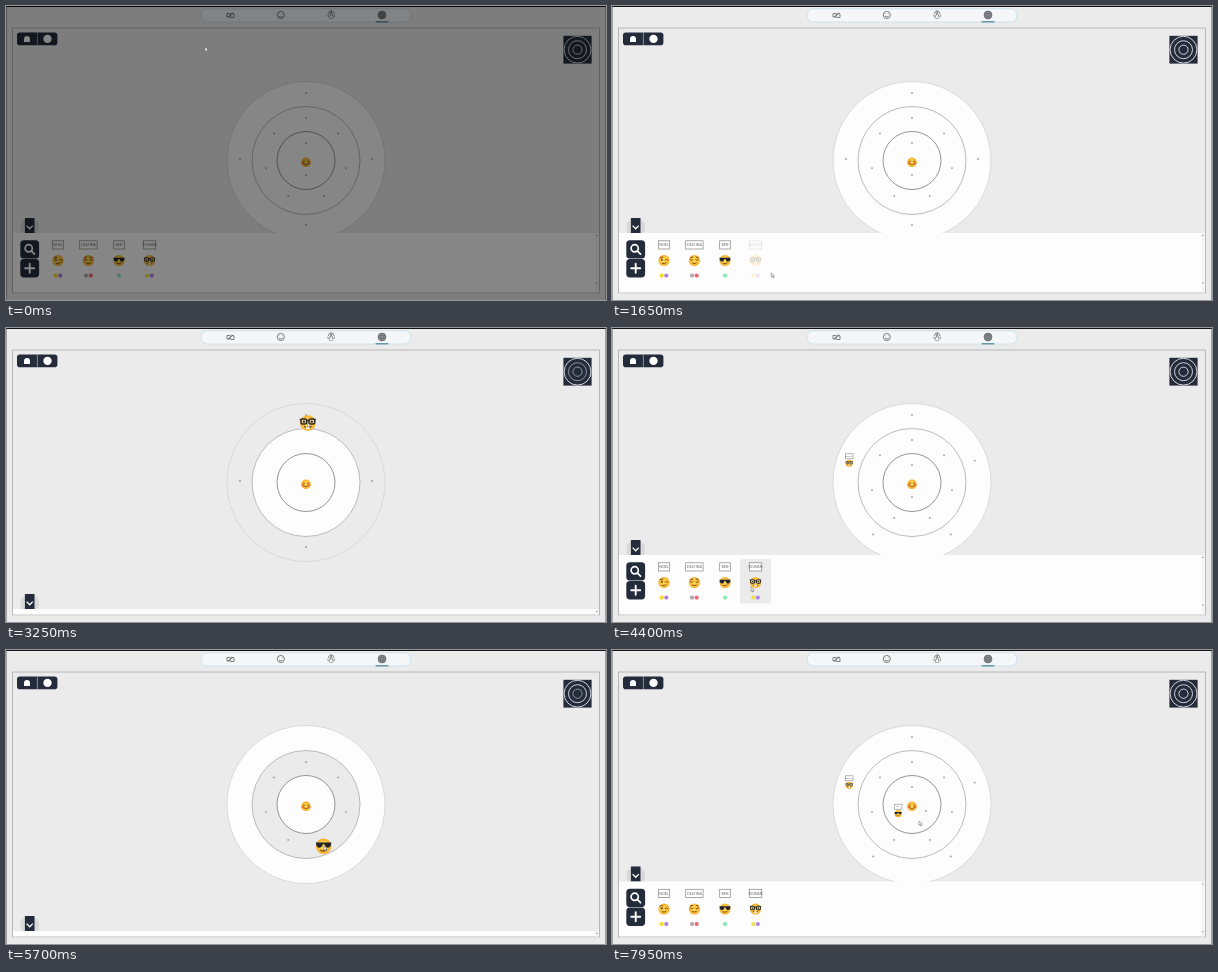
Animation, 600 px wide and 294 px high, one loop 8 s. Source, as an HTML page:

```html
<!DOCTYPE html>
<html lang="en">
<head>
<meta charset="utf-8">
<title>Rings</title>
<style>
html, body { margin: 0; width: 100%; height: 100%; overflow: hidden; background: #ebebeb; }
svg { display: block; width: 100vw; height: 100vh; }
text { font-family: Lato, "Open Sans", sans-serif; text-anchor: middle; fill: #666; }
</style>
</head>
<body>
<svg viewBox="0 0 600 294" preserveAspectRatio="none">
  <defs>
    <radialGradient id="skin"><stop offset=".45" stop-color="#ffd24a"/><stop offset="1" stop-color="#f5ab2b"/></radialGradient>
    <clipPath id="frame"><rect x="7" y="22" width="586" height="264.5"/></clipPath>
    <g id="head"><circle r="8" fill="url(#skin)"/></g>
    <g id="smile" fill="none" stroke="#6b3d12" stroke-width="1.3" stroke-linecap="round">
      <use href="#head" stroke="none"/>
      <circle cx="-5" cy="1.5" r="2" fill="#f5793b" stroke="none"/><circle cx="5" cy="1.5" r="2" fill="#f5793b" stroke="none"/>
      <path d="M-5 -1.5q1.6 -2.6 3.2 0M1.8 -1.5q1.6 -2.6 3.2 0M-3.6 2.5q3.6 4 7.2 0"/>
    </g>
    <g id="wink" fill="none" stroke="#6b3d12" stroke-width="1.3" stroke-linecap="round">
      <use href="#head" stroke="none"/>
      <ellipse cx="-3" cy="-1" rx="1.2" ry="1.7" fill="#6b3d12" stroke="none"/>
      <path d="M-5.5 -4.2q2 -1.6 4 -.5M1.5 -.8q2 -1.6 4 .3M-2.5 4q3 1.8 5.5 -1"/>
    </g>
    <g id="calm" fill="none" stroke="#6b3d12" stroke-width="1.3" stroke-linecap="round">
      <use href="#head" stroke="none"/>
      <path d="M-5.5 -1q1.8 2 3.6 0M1.9 -1q1.8 2 3.6 0M-5.5 -4l3 -1M5.5 -4l-3 -1M-2.8 3.6q2.8 2 5.6 0"/>
    </g>
    <g id="cool">
      <use href="#head"/>
      <path d="M-8 -4H8L7.2 -.5Q5.8 2 3.2 1.3Q1.2 .6 .8 -2H-.8Q-1.2 .6 -3.2 1.3Q-5.8 2 -7.2 -.5Z" fill="#202430"/>
      <path d="M-3 4q3 2.2 6 -.6" fill="none" stroke="#6b3d12" stroke-width="1.2" stroke-linecap="round"/>
    </g>
    <g id="nerd">
      <use href="#head"/>
      <g fill="#f6e3a6" stroke="#2b2a2c" stroke-width="1.5">
        <rect x="-7" y="-4" width="5.8" height="5" rx="1.8"/><rect x="1.2" y="-4" width="5.8" height="5" rx="1.8"/>
        <path d="M-8.2 -3.6h1.6M-1.4 -2.6h2.8M6.6 -3.6h1.6" fill="none"/>
      </g>
      <circle cx="-4" cy="-1.4" r="1.2" fill="#4a2c12"/><circle cx="4" cy="-1.4" r="1.2" fill="#4a2c12"/>
      <path d="M-3.8 3.2q3.8 3.6 7.6 0" fill="none" stroke="#6b3d12" stroke-width="1.2"/>
      <rect x="-1.8" y="3.8" width="3.6" height="2.2" fill="#fff"/>
    </g>
  </defs>

  <rect width="600" height="294" fill="#ebebeb"/>
  <rect x="6.5" y="22" width="587" height="264.8" fill="none" stroke="#b2b2b2" stroke-width=".9"/>

  <rect x="195.2" y="2.8" width="209.6" height="13.2" rx="6" fill="#f5f6f8" stroke="#c3e1eb" stroke-width=".8"/>
  <g fill="none" stroke="#606468" stroke-width=".8">
    <path d="M221 7.5h3.2v3.5h-3.2zM225 7l3 1v3.5h-3.5M222 11l5.5 -4"/>
    <circle cx="274.8" cy="9" r="3.6"/><path d="M273 10.2q1.8 1.6 3.6 0M273.3 7.6v.6M276.3 7.6v.6"/>
    <circle cx="325.2" cy="9.2" r="3.3" stroke-dasharray="2 .8"/><path d="M323.4 10.8l1.8 -4.4l1.8 4.4M322.5 6.5l2.7 -2l2.7 2"/>
    <circle cx="376" cy="9" r="3.9" fill="#888c90"/><circle cx="376" cy="9" r="2"/>
  </g>
  <rect x="369.6" y="15" width="12.8" height="1.5" fill="#6299ac"/>

  <rect x="11" y="26.4" width="40.4" height="12.8" rx="2.8" fill="#242b3b"/>
  <path d="M31.4 26.4v12.8" stroke="#a4a8b0" stroke-width=".8"/>
  <path d="M18 36v-3a3 3 0 0 1 6 0v3z" fill="#fff"/>
  <circle cx="41.5" cy="32.9" r="4.2" fill="#fff"/>

  <rect x="557.4" y="29.8" width="28.2" height="27.8" fill="#242b3b"/>
  <g id="icon" fill="none" stroke="#e4e6ea" stroke-width=".9"></g>

  <g id="board"></g>
  <use href="#smile" transform="translate(300 156.3) scale(.6)"/>

  <g clip-path="url(#frame)"><g id="panel">
    <rect x="14.5" y="-13.5" width="18.5" height="16" rx="6" fill="#d9d9da"/>
    <rect x="18.9" y="-15" width="9.6" height="15.2" fill="#242b3b"/>
    <path d="M20.6 -7.4l3.1 3.2l3.1 -3.2" fill="none" stroke="#fff" stroke-width="1.3"/>
    <rect x="7" width="586" height="62" fill="#fdfdfd"/>
    <rect x="589.5" width="3" height="62" fill="#f4f4f4"/>
    <path d="M589.8 3l1.1 -1.5l1.1 1.5zM589.8 49.5l1.1 1.5l1.1 -1.5z" fill="#999"/>
    <rect x="14.3" y="7.2" width="18.8" height="18.4" rx="3.6" fill="#242b3b"/>
    <rect x="14.3" y="26" width="18.8" height="18.4" rx="3.6" fill="#242b3b"/>
    <g fill="none" stroke="#fff" stroke-width="1.7" stroke-linecap="round">
      <circle cx="22.7" cy="15.3" r="3.6"/><path d="M25.5 18.2l3 3"/>
      <path d="M19.2 35.2h9M23.7 30.7v9" stroke-width="1.9"/>
    </g>
    <g id="items"></g>
  </g></g>

  <use id="drag"/>
  <path d="M0 .5H600" stroke="#111"/>
  <path d="M.3 0V294M599.7 0V294" stroke="#555" stroke-width=".6"/>
  <rect id="shade" width="600" height="294"/>
  <path id="cursor" d="M0 0V5.4L1.3 4.3L2.2 6.3L3.2 5.8L2.3 3.9H4Z" fill="#fff" stroke="#555" stroke-width=".6"/>
</svg>

<script>
const LOOP = 8000;
const CX = 300, CY = 154.5;
const RADII = [79, 54, 29];
const ORBITS = [66, 41, 16];
const LINES = ['#d6d6d6', '#b4b4b4', '#8a8a8a'];
const NERD_DROP = 3450, COOL_DROP = 7450;

const people = [
  { name: 'NOEL', face: 'wink', x: 52, w: 11.4, tags: ['#f4dd1f', '#b07fe0'] },
  { name: 'DELFINA', face: 'calm', x: 82.4, w: 17.4, tags: ['#b3a6ae', '#f06c6c'] },
  { name: 'BEN', face: 'cool', x: 113, w: 10.6, tags: ['#84ecb4'], hover: [4680, 4900], away: [4900, COOL_DROP] },
  { name: 'ROWAN', face: 'nerd', x: 143.5, w: 12.4, tags: ['#f0e04a', '#b583e6'], hover: [1200, 1520], hover2: [4250, 4620], away: [1520, NERD_DROP] }
];

// Pointer path: time, x, y
const route = [
  [0, 199, 41], [150, 199, 41], [900, 156, 153], [1250, 142, 257], [1480, 142, 258],
  [1650, 159, 267], [1850, 210, 230], [2200, 300, 150], [2340, 321, 127], [2400, 324, 107],
  [2600, 316, 104], [2900, 303, 95], [3400, 301, 95], [3750, 301, 95], [4250, 146, 250],
  [4400, 139, 259], [4580, 139, 259], [4720, 114, 255], [4900, 115, 255], [5200, 250, 225],
  [5450, 310, 203], [5650, 318, 196], [5800, 318, 196], [6250, 318, 187], [6600, 313, 172],
  [6850, 309, 165], [7100, 307, 171], [8000, 307, 171]
];
const drags = [
  { face: 'nerd', from: 1720, to: NERD_DROP },
  { face: 'cool', from: 4960, to: COOL_DROP }
];
// Highlighted ring: time, index (0 outer, 2 inner, -1 none)
const focus = [[0, -1], [2080, 0], [2180, 1], [2680, 0], [NERD_DROP, -1],
  [5120, 0], [5280, 1], [5980, 2], [COOL_DROP, -1]];
// Panel: start time, 1 shown or 0 hidden
const slides = [[1675, 0], [3725, 1], [4950, 0], [7625, 1]];

const $ = id => document.getElementById(id);
const clamp = v => Math.max(0, Math.min(1, v));
const within = (t, span) => !!span && t >= span[0] && t < span[1];

function add(parent, tag, attrs, label) {
  const el = document.createElementNS('http://www.w3.org/2000/svg', tag);
  for (const k in attrs) el.setAttribute(k, attrs[k]);
  if (label) el.textContent = label;
  parent.append(el);
  return el;
}

// CSS "ease" curve
function ease(x) {
  let lo = 0, hi = 1;
  for (let i = 0; i < 18; i++) {
    const u = (lo + hi) / 2, v = 1 - u;
    if (.75 * u * v * v + .75 * u * u * v + u ** 3 < x) lo = u; else hi = u;
  }
  return .3 * lo * (1 - lo) ** 2 + 3 * lo * lo * (1 - lo) + lo ** 3;
}

function pointer(t) {
  let i = 1;
  while (i < route.length - 1 && route[i][0] < t) i++;
  const [t0, x0, y0] = route[i - 1], [t1, x1, y1] = route[i];
  const p = clamp((t - t0) / (t1 - t0));
  return [x0 + (x1 - x0) * p, y0 + (y1 - y0) * p];
}

function spots(ring, count) {
  return Array.from({ length: count }, (_, i) => {
    const a = -i * 2 * Math.PI / count;
    return [CX + ORBITS[ring] * Math.sin(a), 153 - ORBITS[ring] * Math.cos(a)];
  });
}

function slots(parent, ring, count, person, at) {
  const g = add(parent, 'g', {});
  spots(ring, count).forEach(([x, y], i) => {
    if (!person || i !== at) {
      add(g, 'circle', { cx: x, cy: y, r: .9, fill: '#999' });
      return;
    }
    add(g, 'rect', { x: x - 3.8, y: y - 6.8, width: 7.6, height: 5, fill: '#fff', stroke: '#888', 'stroke-width': .6 });
    add(g, 'text', { x, y: y - 3.6, 'font-size': 2 }, person.name);
    add(g, 'use', { href: '#' + person.face, transform: `translate(${x} ${y + 2.7}) scale(.45)` });
  });
  return g;
}

const rings = RADII.map((r, i) => add($('board'), 'circle',
  { cx: CX, cy: CY, r, stroke: LINES[i], 'stroke-width': .9 }));
const layers = RADII.map(() => add($('board'), 'g', {}));
const outerFree = slots(layers[0], 0, 4);
const outerUsed = slots(layers[0], 0, 5, people[3], 1);
slots(layers[1], 1, 7);
const innerFree = slots(layers[2], 2, 2);
const innerUsed = slots(layers[2], 2, 3, people[2], 1);
const iconLines = [13.4, 9, 4.6].map(r => add($('icon'), 'circle', { cx: 571.5, cy: 43.7, r }));

for (const p of people) {
  p.bg = add($('items'), 'rect', { x: p.x - 15.5, y: 4, width: 31, height: 44.5, rx: 1.5, fill: '#ebebeb' });
  p.el = add($('items'), 'g', {});
  add(p.el, 'rect', { x: p.x - p.w / 2, y: 7.8, width: p.w, height: 8.2, fill: '#fff', stroke: '#858585', 'stroke-width': .7 });
  add(p.el, 'text', { x: p.x, y: 13.3, 'font-size': 3.6 }, p.name);
  add(p.el, 'use', { href: '#' + p.face, transform: `translate(${p.x} 27.5) scale(.7)` });
  p.tags.forEach((fill, i) => add(p.el, 'circle',
    { cx: p.x + (i - (p.tags.length - 1) / 2) * 4.6, cy: 42.6, r: 2.1, fill }));
}

function panelShown(t) {
  let v = 1;
  for (const [start, to] of slides)
    if (t > start) v += (to - v) * ease(clamp((t - start) / 500));
  return v;
}

// Weight of each ring state, cross-faded over 80 ms
function focusWeights(t) {
  let w = { '-1': 1, 0: 0, 1: 0, 2: 0 };
  for (const [start, ring] of focus) {
    if (t < start) break;
    const p = clamp((t - start + 25) / 80);
    for (const k in w) w[k] += ((+k === ring ? 1 : 0) - w[k]) * p;
  }
  return w;
}

const show = (el, on) => el.setAttribute('visibility', on ? 'visible' : 'hidden');
const fade = (el, v) => el.setAttribute('opacity', v);

function draw(t) {
  const w = focusWeights(t);
  rings.forEach((el, i) => {
    const c = Math.round(253 - 18 * w[i]);
    el.setAttribute('fill', `rgb(${c},${c},${c})`);
    fade(layers[i], w[-1] + w[i]);
  });
  fade(iconLines[0], 1 - .5 * w[2]);
  fade(iconLines[1], 1 - .4 * w[0]);
  fade(iconLines[2], 1 - .4 * (w[0] + w[1]));

  show(outerFree, t < NERD_DROP);
  show(outerUsed, t >= NERD_DROP);
  show(innerFree, t < COOL_DROP);
  show(innerUsed, t >= COOL_DROP);

  $('panel').setAttribute('transform', `translate(0 ${281 - 54 * panelShown(t)})`);
  for (const p of people) {
    show(p.bg, within(t, p.hover) || within(t, p.hover2));
    fade(p.el, within(t, p.away) ? .22 : 1);
  }

  const held = drags.find(d => within(t, [d.from, d.to]));
  show($('drag'), held);
  if (held) {
    const [x, y] = pointer(t - 60);
    $('drag').setAttribute('href', '#' + held.face);
    $('drag').setAttribute('transform', `translate(${x} ${y}) scale(.98)`);
  }
  const [x, y] = pointer(t);
  $('cursor').setAttribute('transform', `translate(${x} ${y}) scale(.8)`);
  fade($('shade'), .47 * (1 - ease(clamp((t - 40) / 450))));
}

const begin = performance.now();
function tick(now) {
  draw(Math.max(0, now - begin) % LOOP);
  requestAnimationFrame(tick);
}
draw(0);
requestAnimationFrame(tick);
</script>
</body>
</html>
```
